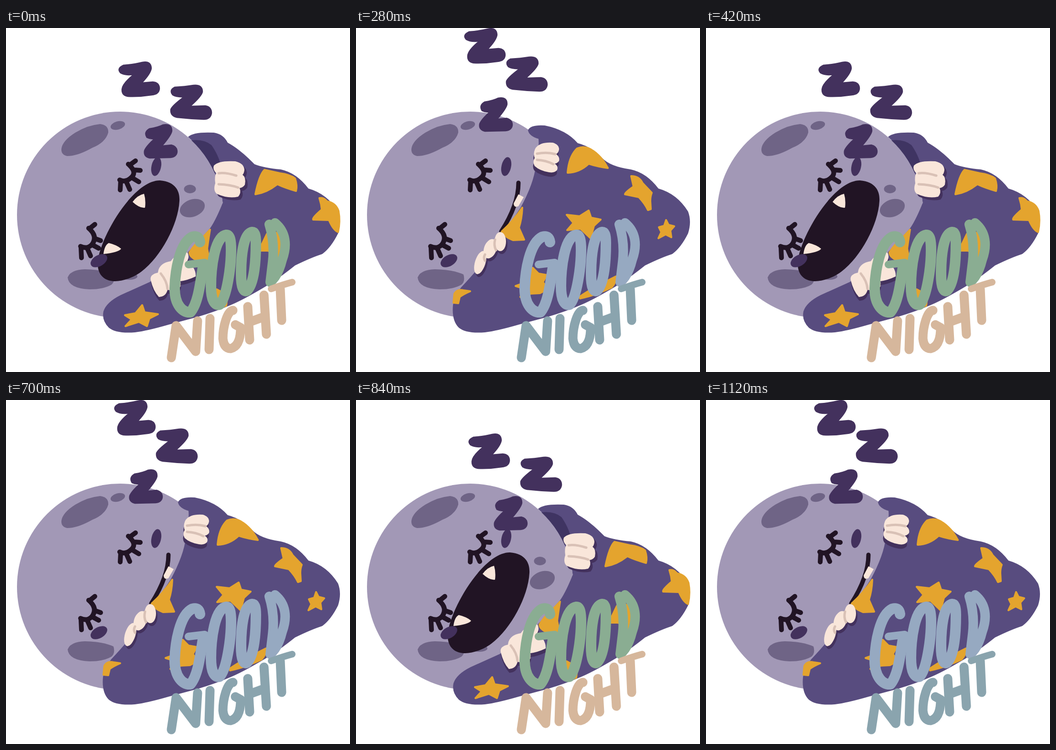
Animation of 720x720 px, one loop 1260 ms. Source, as an HTML page:

```html
<!DOCTYPE html>
<html lang="en">
<head>
<meta charset="utf-8">
<title>Good night</title>
<style>
html, body { margin: 0; width: 100%; height: 100%; overflow: hidden; background: #fff; }
svg { display: block; width: 100%; height: 100%; }
.line { fill: none; stroke-linecap: round; stroke-linejoin: round; }
.crater { fill: #6f6486; }
.cloth { fill: #584c7f; }
.dark { fill: #43315d; }
.ink { fill: #211424; }
.star { fill: #e4a42e; stroke: #e4a42e; stroke-width: 4; stroke-linejoin: round; }
.skin { fill: #f9e6da; }
.crease { stroke: #d9c1b6; stroke-width: 5; }
.z { stroke: #43315d; stroke-width: 2.5; }
</style>
</head>
<body>
<svg viewBox="0 0 720 720" role="img" aria-label="Good night">
<defs>
  <path id="handUp" d="M435 288Q445 277 480 279Q498 283 499 297Q498 305 495 307Q503 313 500 328Q496 334 489 335Q493 345 486 353Q465 358 441 347Q433 340 438 325Q436 310 440 304Q432 296 435 288Z"/>
  <path id="handLow" d="M303 528Q300 516 318 512Q320 492 345 488Q355 472 380 470Q385 480 378 490Q398 500 397 520Q380 528 365 530Q368 545 350 550L338 548Q335 562 320 563Q308 550 303 528Z"/>
  <path id="gripUp" d="M376 251Q386 238 412 240Q425 244 425 254Q424 261 419 264Q427 270 425 278Q422 283 416 284Q424 289 421 297Q416 304 404 302Q385 299 374 289Q369 280 374 272Q370 262 376 251Z"/>
  <g id="gripLow">
    <ellipse cx="260" cy="491" rx="11" ry="25" transform="rotate(17 260 491)"/>
    <ellipse cx="281" cy="462" rx="13" ry="21" transform="rotate(20 281 462)"/>
    <ellipse cx="302" cy="447" rx="12" ry="20"/>
  </g>
</defs>

<circle cx="239" cy="391" r="216" fill="#a298b6"/>
<g class="crater">
  <path d="M116 253Q118 236 145 219Q172 203 197 201Q215 203 214 219Q208 240 180 251Q150 268 128 268Q115 265 116 253Z"/>
  <ellipse cx="234" cy="204" rx="15.500" ry="8.500" transform="rotate(-16 234 204)"/>
  <path d="M129 522Q135 506 165 505Q205 506 225 516Q229 530 221 537Q205 547 175 547Q131 545 129 522Z"/>
</g>
<g class="line" stroke="#211424" stroke-width="10">
  <path d="M256 285Q276 302 261 314Q250 324 238 318M260 286L271 278M268 297L281 298M263 313L278 322M251 320L259 338M240 320L239 339"/>
  <path d="M173 419Q193 436 180 453Q170 464 156 457M176 419L186 411M187 441L198 445M181 454L194 461M170 461L177 477M157 460L158 481"/>
</g>

<g id="yawn">
  <g class="crater">
    <ellipse cx="385" cy="337" rx="12.500" ry="9"/>
    <ellipse cx="390" cy="377" rx="27" ry="18" transform="rotate(-20 390 377)"/>
    <ellipse cx="258" cy="520" rx="17" ry="7"/>
  </g>
  <path class="ink" d="M192 490C196 440 265 319 322 319C358 322 364 345 363 362C360 420 310 505 260 523C225 538 190 530 192 490Z"/>
  <path class="skin" d="M265 364Q275 350 289 347Q293 360 291 376Q280 378 265 364ZM204 473Q206 455 215 450Q232 454 241 462Q235 470 204 473Z"/>
</g>
<g id="gape">
  <path class="ink" d="M276 440C276 405 300 350 335 328C354 332 356 380 342 405L300 455Q280 463 276 440Z"/>
</g>
<path id="smile" class="line" d="M340 324Q340 370 304 426" stroke="#211424" stroke-width="9"/>
<path id="tooth" class="skin" d="M340 348L351 354L340 373Q330 377 330 367Z"/>

<g class="dark">
  <ellipse cx="314.500" cy="290" rx="10" ry="20" transform="rotate(12 314.500 290)"/>
  <ellipse cx="194.500" cy="487" rx="19" ry="11.500" transform="rotate(-30 194.500 487)"/>
</g>

<g id="low">
  <path class="cloth" d="M381 228Q392 217 435 219Q455 222 464 240Q490 254 520 285Q540 293 575 296Q608 303 633 336Q672 347 695 384Q703 405 695 430Q680 460 662 473Q640 480 605 497Q570 525 545 540Q500 567 470 580Q440 593 400 605L340 621Q295 634 270 637Q230 640 215 627Q200 612 204 593Q210 574 240 559L300 532Q345 505 380 470Q405 445 428 418Q440 400 453.600 366A216 216 0 0 0 381 228Z"/>
  <path fill="#3f3462" d="M388 235Q415 232 430 245Q442 262 448 281L437 304A216 216 0 0 0 388 235Z"/>
  <g class="star">
    <path d="M522 348Q530 308 541 297L573 304Q595 307 605 315Q610 330 607 341Q585 335 568 327Q545 345 522 348Z"/>
    <path d="M656 356Q665 354 672 363Q690 366 696 383Q700 405 695 427Q685 423 676 402L643 401Q640 398 661 380Q660 368 656 356Z"/>
    <path d="M517 466Q518 461 534 456L546 431L570 428Q575 440 574 460Q576 480 569 486L561 484Q561 470 548 466Z"/>
    <path d="M427 422Q424 440 421 462L426 488L400 486Q385 480 384 470Q395 452 412 438Z"/>
    <path d="M434 580L441 547L452 553L462 570L461 581L447 586Z"/>
    <path d="M249 601L271 597L285 580L290 595L318 599L300 608L295 624L278 615L250 624L263 610Z"/>
  </g>
  <use href="#handUp" class="dark" x="5" y="6"/>
  <use href="#handLow" class="dark" x="1" y="8"/>
  <g class="skin"><use href="#handUp"/><use href="#handLow"/></g>
  <path class="line crease" d="M445 304Q460 302 482 309M445 327Q470 328 486 334M324 514Q337 530 338 546M350 504Q362 522 363 540"/>
</g>

<g id="high">
  <path class="cloth" d="M360 214Q365 202 395 204Q440 213 464 241Q490 247 515 272Q532 290 575 296Q608 303 633 336Q672 347 695 384Q703 405 695 430Q680 460 662 473Q640 480 605 497Q570 525 545 540Q500 567 470 580Q440 593 400 605L340 621Q295 634 270 637Q230 640 215 627Q200 612 203 580Q206 560 220 543Q248 513 262 495Q315 421 345 375Q372 325 376 290Q384 250 382 232Q362 226 360 214Z"/>
  <g class="star">
    <path d="M443 302Q446 268 463 252Q480 245 496 257Q514 269 527 293Q505 290 487 284Q468 302 443 303Z"/>
    <path d="M576 310Q593 310 600 325L619 345Q616 352 616 362L617 379L611 381Q605 368 592 354L563 348Q562 345 581 332Z"/>
    <path d="M649 402L654 412L666 415L658 424L660 438L648 432L633 440L639 427L634 417L645 414Z"/>
    <path d="M487 382L492 397L512 401L498 414L491 440L470 420L442 423L455 408L441 391L468 394Z"/>
    <path d="M348 376Q347 400 341 418L352 443L329 444Q310 437 305 426Q330 403 348 376Z"/>
    <path d="M206 556Q212 546 225 549L239 551Q225 557 217 563L214 576L204 575Z"/>
    <path d="M370 502L382 514L399 517L391 532L402 546L385 555L366 556L344 563L353 546L334 540L360 531Z"/>
    <path d="M469 562Q490 547 544 520Q546 530 535 543Q500 560 469 566Z"/>
  </g>
  <use href="#gripUp" class="dark" x="-1" y="9"/>
  <use href="#gripLow" class="dark" x="3" y="6"/>
  <g class="skin"><use href="#gripUp"/><use href="#gripLow"/></g>
  <path class="line crease" d="M379 263Q400 259 417 264M379 276Q398 277 413 285M291 443Q288 455 293 465M270 474Q266 481 270 487"/>
</g>

<g class="dark">
  <path class="z" d="M246 78Q270 76 285 72Q303 68 304 84Q303 95 284 115L307 113Q321 114 321 127Q320 139 305 140Q280 144 255 143Q242 141 243 128Q244 116 268 97Q250 100 240 94Q231 85 246 78Z"/>
  <path class="z" d="M353 124Q375 123 392 120Q411 118 411 133Q410 142 385 164L417 163Q430 165 430 178Q428 191 414 191Q385 190 358 187Q344 184 345 171Q346 164 373 144Q357 145 349 140Q341 130 353 124Z"/>
  <path class="z" d="M300 211Q318 208 328 203Q347 199 347 215Q346 224 326 247L346 245Q358 248 358 259Q357 270 344 271L301 272Q288 269 290 257Q293 248 312 231Q302 233 295 229Q288 218 300 211Z"/>
</g>

<g id="good" class="line" stroke-width="22">
  <path d="M406 448Q404 433 390 437C363 450 354 510 353 545C353 580 370 596 386 595C403 575 407 530 413 495"/>
  <path d="M382 495L416 491" stroke-width="16"/>
  <path d="M461 433C437 436 429 500 429 540C429 570 437 582 447 579C462 565 471 500 471 465C471 445 469 433 461 433Z"/>
  <path d="M515 427C496 430 492 480 492 515C492 545 498 553 504 550C521 535 523 480 523 450C523 431 520 427 515 427Z"/>
  <path d="M551 411Q563 450 558 490L553 532C562 525 572 510 578 485C589 455 586 427 563 408" stroke-width="20"/>
</g>
<g id="night" class="line" stroke-width="19">
  <path d="M346 690L356 623L397 677L401 613M427 608L425 673"/>
  <path d="M475 591C463 592 454 625 454 650Q456 671 470 671Q491 666 491 627L480 621"/>
  <path d="M506 583L510 653M540 559L545 641M508 616L541 604M574 546L577 612"/>
  <path d="M555 546Q580 537 599 532" stroke-width="14"/>
</g>
</svg>
<script>
const STEP = 140;
const el = id => document.getElementById(id);
const zs = [...document.querySelectorAll(".z")];
const drift = [[-9, -70], [-30, -59], [-31, -56]];
const poses = [
  { show: ["yawn", "low"], rise: 0, good: "#8aad92", night: "#d6b79c" },
  { show: ["gape", "tooth", "high"], rise: .31, good: "#90aba8", night: "#b0aea5" },
  { show: ["smile", "tooth", "high"], rise: 1, good: "#96a9c1", night: "#8aa4ae" }
];
const parts = ["yawn", "gape", "smile", "tooth", "low", "high"];

function draw(now) {
  const pose = poses[Math.floor(now / STEP) % poses.length];
  for (const id of parts) el(id).style.display = pose.show.includes(id) ? "" : "none";
  zs.forEach((z, i) => {
    const [x, y] = drift[i].map(d => d * pose.rise);
    z.setAttribute("transform", `translate(${x} ${y})`);
  });
  el("good").style.stroke = pose.good;
  el("night").style.stroke = pose.night;
}

const start = performance.now();
function tick() {
  draw(performance.now() - start);
  requestAnimationFrame(tick);
}
tick();
</script>
</body>
</html>
```
